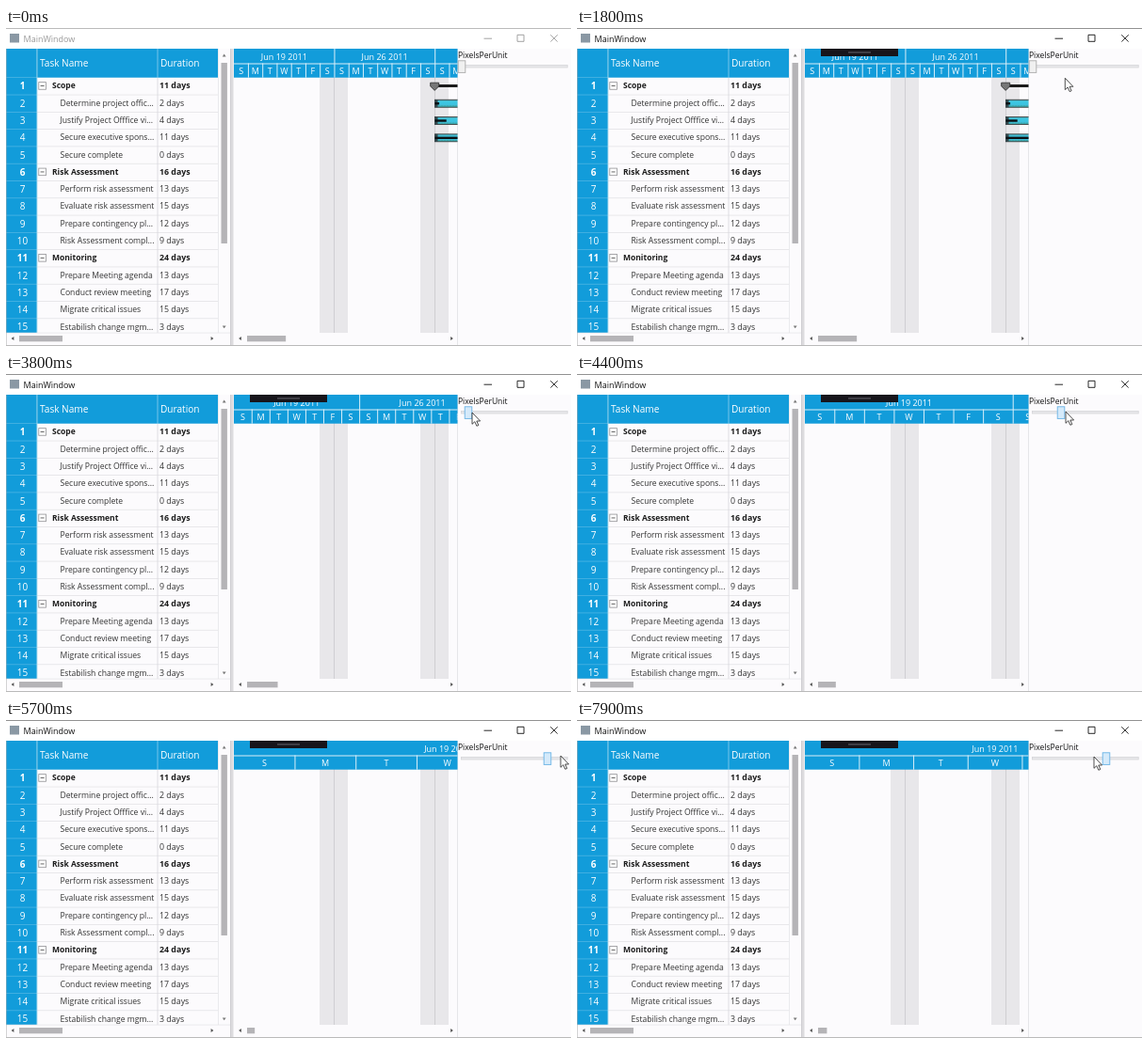
These frames come from a looping animation (600x338 px, 8000 ms). An HTML page:

```html
<!DOCTYPE html>
<html lang="en">
<head>
<meta charset="utf-8">
<title>Gantt zoom</title>
<style>
  html, body { margin: 0; width: 100%; height: 100%; overflow: hidden; background: #fcfbfd; }
  svg { display: block; width: 600px; height: 338px; }
  text { font-family: "Open Sans", "Noto Sans", sans-serif; font-size: 9px; fill: #333; }
  .mid { text-anchor: middle; }
  .white { fill: #fff; }
  .head { font-size: 10.1px; fill: #fff; }
  .num { font-size: 10px; fill: #fff; text-anchor: middle; }
  .task { font-size: 8.6px; }
  .days { font-size: 8.8px; }
  .bold { font-weight: 700; fill: #1c1c1c; }
  .task.bold { font-size: 8.5px; }
</style>
</head>
<body>
<svg id="stage" viewBox="0 0 600 338">
  <defs>
    <clipPath id="chartClip"><rect x="242" y="22" width="237.5" height="302"/></clipPath>
    <linearGradient id="barFill" x2="0" y2="1">
      <stop offset="0" stop-color="#4fa9b4"/>
      <stop offset=".3" stop-color="#3cc8e4"/>
      <stop offset=".7" stop-color="#3fc0dc"/>
      <stop offset="1" stop-color="#3a9a96"/>
    </linearGradient>
  </defs>
  <g id="grid"></g>
  <g id="chart" clip-path="url(#chartClip)"></g>
  <g id="chrome"></g>
</svg>
<script>
const BLUE = '#129cda', LOOP = 8000, STEP = 100;
const CHART_X = 242, CHART_END = 479.5, ROW_TOP = 52.4, ROW_H = 18.29;
const MIN_THUMB = 484, MIN_DAY = 15.25, DAY_PER_PIXEL = 0.544;
const ACTIVATED = 1300, HOVERED = 2100;

const tasks = [
  ['Scope', 11, true], ['Determine project offic...', 2], ['Justify Project Offfice vi...', 4],
  ['Secure executive spons...', 11], ['Secure complete', 0],
  ['Risk Assessment', 16, true], ['Perform risk assessment', 13], ['Evaluate risk assessment', 15],
  ['Prepare contingency pl...', 12], ['Risk Assessment compl...', 9],
  ['Monitoring', 24, true], ['Prepare Meeting agenda', 13], ['Conduct review meeting', 17],
  ['Migrate critical issues', 15], ['Estabilish change mgm...', 3]
];

// [time, x, y]
const cursorKeys = [
  [1300, 604, 84], [2000, 484, 41], [2900, 484, 41], [3800, 495, 41], [4400, 519, 40],
  [4700, 534, 40], [5600, 582, 38], [5700, 589, 38], [6200, 597, 38], [7200, 597, 38], [7900, 549, 39]
];
// [time, x]
const thumbKeys = [
  [2900, 484], [3800, 491], [4400, 514], [4700, 528], [5600, 570], [5700, 575],
  [6500, 596], [7200, 596], [7900, 562]
];

const byId = id => document.getElementById(id);
const rect = (x, y, w, h, fill, extra = '') =>
  `<rect x="${x}" y="${y}" width="${w}" height="${h}" fill="${fill}" ${extra}/>`;
const path = (d, fill, extra = '') => `<path d="${d}" fill="${fill}" ${extra}/>`;
const line = (d, color, width = 1, extra = '') =>
  path(d, 'none', `stroke="${color}" stroke-width="${width}" ${extra}`);
const text = (x, y, str, cls = '', extra = '') =>
  `<text x="${x}" y="${y}" class="${cls}" ${extra}>${str}</text>`;

function sample(keys, t, field = 1) {
  if (t <= keys[0][0]) return keys[0][field];
  for (let i = 1; i < keys.length; i++) {
    const a = keys[i - 1], b = keys[i];
    if (t <= b[0]) return a[field] + (b[field] - a[field]) * (t - a[0]) / (b[0] - a[0]);
  }
  return keys[keys.length - 1][field];
}

function arrow(x, y, angle, color = '#555') {
  return path('M-1.9 1.4L0-1.4L1.9 1.4Z', color, `transform="translate(${x} ${y}) rotate(${angle})"`);
}

function drawGrid() {
  let out = rect(0, 22, 225, 30.7, BLUE) + rect(0, 52, 33, 272, BLUE);
  out += text(36, 41.3, 'Task Name', 'head') + text(164, 41.3, 'Duration', 'head');
  out += rect(0, 52, 33, .7, '#55b8e4');
  tasks.forEach(([name, days, group], i) => {
    const top = ROW_TOP + i * ROW_H, mid = top + ROW_H / 2, bold = group ? ' bold' : '';
    if (i) out += rect(0, top, 33, .7, '#55b8e4') + rect(33, top, 192, .7, '#e0e0e3');
    out += text(17.5, mid + 3.8, i + 1, 'num', group ? 'font-weight="700"' : '');
    out += text(group ? 49 : 57.5, mid + 2.9, name, 'task' + bold);
    out += text(163, mid + 2.9, days + ' days', 'days' + bold);
    if (group) {
      out += rect(34.8, mid - 3.9, 7.6, 7.6, '#fff', 'stroke="#909094" stroke-width=".8"');
      out += rect(36.6, mid - .5, 4, .9, '#555');
    }
  });
  out += rect(32.5, 22, .9, 302, '#a9d9ee') + rect(160.6, 22, .8, 31, '#8fd0ed');
  out += rect(160.6, 53, .8, 271, '#d8d8dc') + rect(225, 22, .7, 302, '#e2e2e5');
  out += rect(0, 323.7, 238, .7, '#e2e2e5');
  out += rect(228.5, 37, 6.4, 192, '#b5b4b7');
  out += arrow(231.7, 29, 0, '#777') + arrow(231.7, 317.9, 180, '#777');
  out += rect(14, 327, 46, 6.3, '#b5b4b7') + arrow(7, 330, -90) + arrow(219, 330, 90);
  out += rect(238.3, 22, 3.2, 315, '#dcdbde') + rect(238.3, 22, .6, 315, '#bfbfc3');
  out += arrow(248.5, 330, -90) + arrow(473.5, 330, 90);
  out += rect(479.3, 22, .7, 315, '#dddde0');
  byId('grid').innerHTML = out;
}

function taskBars(day) {
  const x = CHART_X + 14 * day;
  if (x - 6 > CHART_END) return '';
  const lengths = [2, 4, 11], progress = [.3, .8, 9];
  let out = rect(x, 60, 11 * day, 3, '#1c1c1c');
  out += path(`M${x - 4.8} 58.2H${x + 4.2}V61.9L${x - .3} 66.4L${x - 4.8} 61.9Z`, '#777',
    'stroke="#333" stroke-width=".9"');
  lengths.forEach((length, i) => {
    const mid = ROW_TOP + (i + 1.5) * ROW_H + .4;
    out += rect(x, mid - 4, length * day, 8, 'url(#barFill)', 'stroke="#333" stroke-width=".8"');
    out += line(`M${x + 4} ${mid + 2.6}h${length * day}`, '#3a9a8c', .8, 'stroke-dasharray="1 2"');
    out += rect(x, mid - 4, 3, 8, '#34474c') + rect(x, mid - 1.2, progress[i] * day, 2.4, '#0b1114');
  });
  return out;
}

function drawChart(day) {
  let out = '';
  for (const x of [333, 440]) {
    out += rect(x, 52, 30, 272, '#e8e7ea') + rect(x + 15, 52, .8, 272, '#c9c8cc');
  }
  out += taskBars(day);
  out += rect(CHART_X, 22, 238, 30.7, BLUE) + rect(CHART_X, 37.5, 238, 1, '#d9eff9');
  for (let i = 0; CHART_X + i * day < CHART_END; i++) {
    const x = CHART_X + i * day, weekStart = i % 7 === 0;
    const top = weekStart ? 22 : 37.5;
    if (i) out += rect(x - .3, top, 1, 52.7 - top, '#d9eff9');
    out += text(x + day / 2, 48.8, 'SMTWTFS'[i % 7], 'white mid');
    if (weekStart) {
      const label = ['Jun 19 2011', 'Jun 26 2011', 'Jul 03 2011'][i / 7];
      out += text(x + 3.5 * day, 33.8, label, 'white mid');
    }
  }
  byId('chart').innerHTML = out;
}

function drawChrome(t, thumb, day) {
  const active = t >= ACTIVATED, hover = t >= HOVERED;
  const ink = active ? '#111' : '#999';
  let out = rect(0, 0, 600, 22, '#fff') + rect(0, 0, 600, .8, active ? '#777' : '#aaa');
  out += rect(4, 6, 10, 9.5, '#8a98a4');
  out += text(18.5, 14.5, 'MainWindow', '', `style="font-size:9px;fill:${ink}"`);
  out += line('M507.5 11.2h8.5M543 7.3h7v7h-7zM578.3 7.2l7.4 7.4m0-7.4l-7.4 7.4', ink, .9);
  out += rect(0, 337.2, 600, .8, '#aaa') + rect(0, 22, .5, 315, '#aaa');

  out += rect(256, 327, 658 / day - 2, 6.3, '#b5b4b7');
  out += text(480, 31.6, 'PixelsPerUnit', '', 'style="font-size:8.5px;fill:#111"');
  out += rect(483.4, 39.4, 112.8, 2.6, '#e7e7ea', 'stroke="#d2d2d5" stroke-width=".7"');
  out += rect(thumb - 3.8, 34.8, 7.6, 12.6, hover ? '#d5eafa' : '#f0f0f0',
    `stroke="${hover ? '#69b3e5' : '#acacac'}" stroke-width=".9"`);

  if (active) {
    out += rect(259, 22, 82, 8, '#17151b') + rect(288, 25, 24, 1.8, '#44424a');
    out += path('M0 0V12.3L2.8 9.7L4.9 14.3L6.8 13.4L4.8 9H8.6Z', '#fff',
      `stroke="#222" stroke-width=".8" transform="translate(${sample(cursorKeys, t)} ${sample(cursorKeys, t, 2)})"`);
  }
  byId('chrome').innerHTML = out;
}

let lastStep = -1;
function render(now) {
  const t = Math.floor(now % LOOP / STEP) * STEP;
  if (t !== lastStep) {
    lastStep = t;
    const thumb = sample(thumbKeys, t);
    const day = MIN_DAY + (thumb - MIN_THUMB) * DAY_PER_PIXEL;
    drawChart(day);
    drawChrome(t, thumb, day);
  }
}

drawGrid();
const start = performance.now();
function tick() {
  render(performance.now() - start);
  requestAnimationFrame(tick);
}
tick();
</script>
</body>
</html>
```
